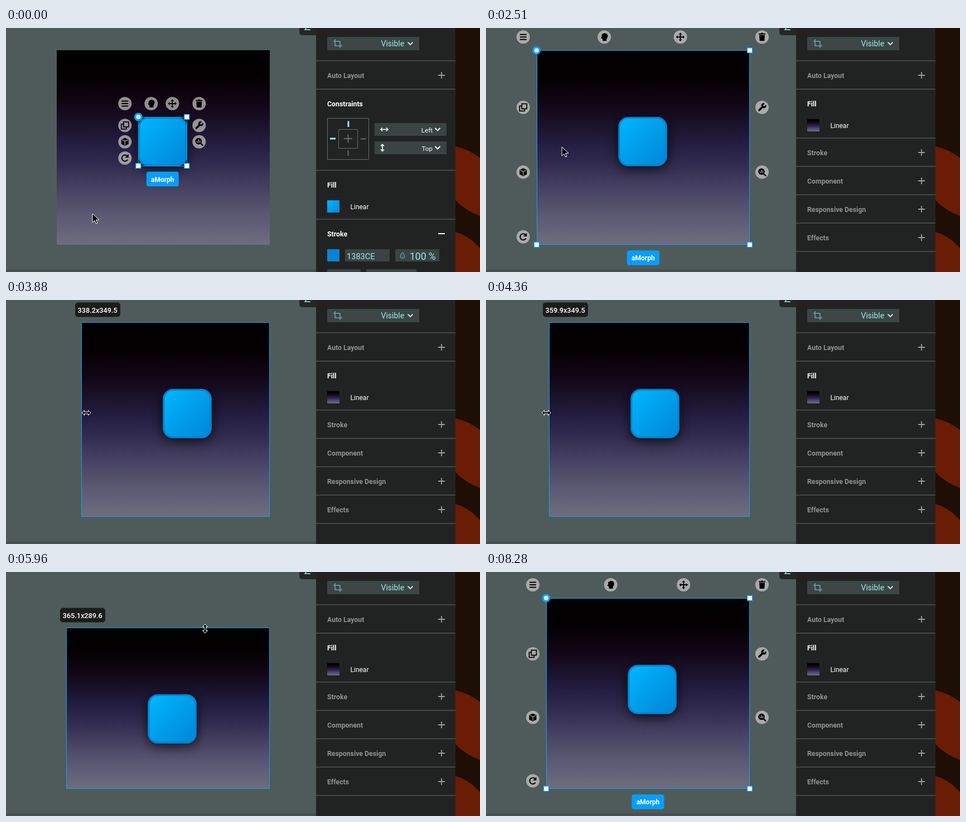
An HTML page for the animation above (9.02 s loop, 850x439 px).

```html
<!DOCTYPE html>
<html lang="en">
<head>
<meta charset="utf-8">
<title>Resizing a frame</title>
<style>
  html, body { margin: 0; width: 100%; height: 100%; overflow: hidden; background: #4f5b5a; }
  svg { display: block; }
  text { font-family: Roboto, "Liberation Sans", sans-serif; }
  .head { font-size: 12.3px; font-weight: 700; fill: #fff; }
  .dim { fill: #8f9392; }
  .body { font-size: 12px; fill: #fff; }
  .cyan { fill: #9fe9ec; }
  .line { fill: none; stroke: #000; stroke-width: 2; }
  .disc { fill: rgba(215, 213, 213, .66); }
</style>
</head>
<body>
<svg id="stage" width="850" height="439" viewBox="0 0 850 439">
  <defs>
    <linearGradient id="dusk" x2="0" y2="1">
      <stop offset="0" stop-color="#000"/>
      <stop offset=".13" stop-color="#040001"/>
      <stop offset=".28" stop-color="#120616"/>
      <stop offset=".38" stop-color="#1a122b"/>
      <stop offset=".48" stop-color="#231d40"/>
      <stop offset=".6" stop-color="#332e51"/>
      <stop offset=".72" stop-color="#484363"/>
      <stop offset=".85" stop-color="#5b5973"/>
      <stop offset="1" stop-color="#6e6d80"/>
    </linearGradient>
    <linearGradient id="sky" x2="1" y2="1">
      <stop offset="0" stop-color="#00b6ff"/>
      <stop offset="1" stop-color="#0786d6"/>
    </linearGradient>
    <filter id="shadow" x="-60%" y="-60%" width="220%" height="220%">
      <feDropShadow dx="0" dy="4" stdDeviation="11" flood-color="#000" flood-opacity=".8"/>
    </filter>
  </defs>

  <rect width="850" height="439" fill="#4f5b5a"/>
  <rect y="434" width="556" height="5" fill="#475053"/>

  <rect id="frame" fill="url(#dusk)"/>
  <rect id="tile" width="84.5" height="85.5" rx="16.5" fill="url(#sky)" stroke="#0685d3" stroke-width="3" filter="url(#shadow)"/>
  <rect id="outline" fill="none" stroke="#0c9ffb"/>

  <g id="halo"></g>

  <g id="size">
    <rect width="81" height="26" rx="5" fill="#1b1d1d"/>
    <text id="sizeText" x="4.5" y="18.5" font-size="12.7" font-weight="500" fill="#fff"></text>
  </g>

  <g id="wallpaper">
    <rect x="806" width="44" height="439" fill="#1e0f04"/>
    <g fill="#6b1c04">
      <path d="M806 213Q830 218 850 234V338Q826 330 806 310Z"/>
      <path d="M806 367Q830 374 850 396V439H806Z"/>
    </g>
  </g>
  <path d="M526 0H556V13H532Q526 13 526 7Z" fill="#242726"/>
  <path d="M535 3H546M537.5 0V3" stroke="#9fe9ec" stroke-width="1.6"/>
  <rect x="556" width="250" height="439" fill="#212322"/>
  <g id="common"></g>
  <g id="tilePanel"></g>
  <g id="framePanel"></g>

  <g id="cursor" fill="#000" stroke="#fff" stroke-linejoin="round">
    <path id="arrow" d="M0 0V16L4 12.3L6.6 18L9 17L6.5 11.3H12Z"/>
    <path id="resize" d="M-8 0L-3.5-4.5V-1.7H3.5V-4.5L8 0L3.5 4.5V1.7H-3.5V4.5Z"/>
  </g>
</svg>

<script>
const $ = id => document.getElementById(id);
const set = (el, attrs) => { for (const k in attrs) el.setAttribute(k, attrs[k]); };
const show = (el, on) => el.setAttribute('visibility', on ? 'visible' : 'hidden');
const place = (el, x, y, extra = '') => el.setAttribute('transform', `translate(${x} ${y})${extra}`);

// Properties panel
const box = (x, y, w, h, fill = '#3a4442', rx = 1) =>
  `<rect x="${x}" y="${y}" width="${w}" height="${h}" rx="${rx}" fill="${fill}"/>`;
const text = (x, y, str, cls = 'head', attrs = '') => `<text x="${x}" y="${y}" class="${cls}" ${attrs}>${str}</text>`;
const stroke = (d, color, w = 2) => `<path d="${d}" fill="none" stroke="${color}" stroke-width="${w}"/>`;
const rule = y => box(556, y - 1, 250, 2, '#424746', 0);
const chevron = (x, y, color) => stroke(`M${x - 4.5} ${y - 2.5}l4.5 4.5l4.5-4.5`, color);
const plusRow = (y, label) => text(576, y + 5, label, 'head dim') + stroke(`M775 ${y}H787M781 ${y - 6}v12`, '#979b9a', 1.8);
const select = (y, label, icon) => box(661, y, 129, 23) + stroke(icon, '#fff', 1.6) +
  text(765, y + 16.5, label, 'body', 'text-anchor="end" style="font-size:11.6px"') + chevron(774, y + 11.5, '#fff');

$('common').innerHTML =
  box(576, 16, 165, 24, '#3b4645') +
  stroke('M590 20V32H603M587 24H599V36', '#6ba9ab', 1.5) +
  text(672.5, 33, 'Visible', 'cyan', 'font-size="14"') + chevron(725, 28, '#9fe9ec') +
  rule(59) + plusRow(85, 'Auto Layout') + rule(110);

$('tilePanel').innerHTML =
  text(576, 141, 'Constraints') +
  stroke('M576.5 162.5H650.5V236.5H576.5ZM596.5 182.5H630.5V216.5H596.5Z', '#666b6a', 1) +
  stroke('M606 199H621M613.5 191.5V206.5M636 199.5H645.5M613.5 220V230', '#777c7b', 1.6) +
  stroke('M614 167.5V178M581 199H591', '#9fe9ec', 3) +
  select(171, 'Left', 'M672 182.5H685M675 179.5L672 182.5L675 185.5M682 179.5L685 182.5L682 185.5') +
  select(204, 'Top', 'M675 209.5V221.5M672 212.5L675 209.5L678 212.5M672 218.5L675 221.5L678 218.5') +
  rule(256) + text(576, 287, 'Fill') + box(576, 310, 22, 22, 'url(#sky)', 0) + text(617.5, 326, 'Linear', 'body') +
  rule(344) + text(576, 375, 'Stroke') + stroke('M775 370H787', '#fff') +
  box(576, 398, 22, 22, '#0a83d4', 0) +
  box(608, 398, 80, 22) + text(611, 416, '1383CE', 'cyan', 'font-size="14.6"') +
  box(698, 398, 79, 22) + text(724, 416.5, '100 %', 'cyan', 'font-size="17.5"') +
  '<path d="M711 403.5q4 5 4 7a4 4 0 0 1-8 0q0-2 4-7z" fill="#35595b" stroke="#78b9bb"/>' +
  box(576, 434, 60, 8) + box(646, 434, 90, 8);

$('framePanel').innerHTML =
  text(576, 141, 'Fill') + box(576, 164, 22, 22, 'url(#dusk)', 0) + text(617.5, 180, 'Linear', 'body') +
  ['Stroke', 'Component', 'Responsive Design', 'Effects']
    .map((label, i) => rule(198 + 51 * i) + plusRow(224 + 51 * i, label)).join('') + rule(402);

// Selection halo: icons are centred on their own origin
const icons = {
  menu: '<path class="line" d="M-6-4.5H6M-6 0H6M-6 4.5H6"/>',
  grab: '<path d="M-6 1L-4.5-1V-4Q-4-6-2-6Q0-8 2-6.5Q4.5-7 5-5Q6.7-4 6 0L4 4V7H-3V4Z"/>',
  move: '<path class="line" d="M0-6V6M-6 0H6"/><path d="M0-8L3-4.5H-3ZM0 8L3 4.5H-3ZM-8 0L-4.5-3V3ZM8 0L4.5-3V3Z"/>',
  trash: '<path d="M-6-6.5h4l1-1.2h2l1 1.2h4v2h-12zM-5-3.5h10l-.7 10.5h-8.6z"/>',
  copy: '<path class="line" style="stroke-width:1.7" d="M-2.5-6.5H6.5V2.5H-2.5ZM-2.5-2.5H-6.5V6.5H2.5V2.5"/>',
  wrench: '<path class="line" style="stroke-width:3.6;stroke-linecap:round" d="M-5 5L1.5-1.5"/><path class="line" style="stroke-width:3" d="M6.3-4A3.2 3.2 0 1 1 4-6.3"/>',
  cube: '<path d="M0-7L6.5-4V4L0 7.3L-6.5 4V-4Z"/><path d="M-5.5-3.5L0-1L5.5-3.5M0-1V6" fill="none" stroke="#a5a5a6" stroke-width="1.3"/>',
  zoom: '<circle cx="-1" cy="-1" r="5.8"/><path class="line" style="stroke-width:2.6" d="M3 3L7 7"/><path d="M-3.5 1.5V-1M-1 1.5V-4M1.5 1.5V-2.5" stroke="#a5a5a6" stroke-width="1.4"/>',
  redo: '<path class="line" d="M4.8 3A5.6 5.6 0 1 1 4-4"/><path d="M6.5-7V-.8H.3Z"/>'
};
const knob = id => `<rect id="${id}" x="-4.5" y="-4.5" width="9" height="9" fill="#fff" stroke="#0c9ffb" stroke-width="1.2"/>`;
$('halo').innerHTML =
  Object.keys(icons).map(k => `<g id="${k}"><circle class="disc" r="12"/>${icons[k]}</g>`).join('') +
  knob('ne') + knob('sw') + knob('se') +
  '<circle id="nw" r="5.8" fill="#d3ecff" stroke="#0c9ffb" stroke-width="3.4"/>' +
  '<g id="tag"><rect x="-29" width="58" height="26.5" rx="4" fill="#069efc"/>' +
  '<text y="18" font-size="12" font-weight="700" fill="#fff" text-anchor="middle">aMorph</text></g>';

function layHalo(l, t, r, b) {
  const w = r - l, h = b - t;
  const west = l - 24, east = r + 22, north = t - 24, south = b - 14;
  const upper = south - h * 2 / 3, lower = south - h / 3;
  const spots = {
    menu: [west, north], grab: [r - w * 2 / 3 - 6, north], move: [r - w / 3 + 3, north], trash: [east, north],
    copy: [west, upper], wrench: [east, upper], cube: [west, lower], zoom: [east, lower], redo: [west, south],
    nw: [l, t], ne: [r, t], sw: [l, b], se: [r, b], tag: [(l + r) / 2, b + 10.5]
  };
  for (const k in spots) place($(k), ...spots[k]);
}

// Motion: [tick, value...] with straight lines between, on a fixed tick
const LOOP = 9020, TICK = 59.6, RIGHT = 473, BOTTOM = 389.8;
const pointer = [
  [17, 155, 334], [19, 157.5, 304], [21, 157.5, 304], [22, 159, 304], [25, 159, 304],
  [33, 136, 214], [44, 136, 214], [50, 91, 204], [59, 91, 203], [65, 144, 203], [66, 144, 203],
  [73, 108, 203], [76, 108, 203], [82, 401, 48], [87, 356, 42.3], [92, 356, 42.3],
  [99, 357, 100], [100, 357, 102], [101, 357, 102], [108, 356, 52], [111, 356, 49], [114, 356, 49],
  [120, 520, 145], [122, 520, 145], [125, 527, 205], [135, 527, 205], [138, 805, 352]
];
const leftEdge = [[60, 90.7], [66, 143.6], [67, 144], [74, 107.9]];
const topEdge = [[92, 40.3], [99, 98], [100, 100.2], [101, 100.2], [108, 50], [111, 46.9]];

function at(keys, n) {
  const i = keys.findIndex(k => k[0] >= n);
  if (i === 0) return keys[0].slice(1);
  if (i < 0) return keys[keys.length - 1].slice(1);
  const a = keys[i - 1], b = keys[i], f = (n - a[0]) / (b[0] - a[0]);
  return a.slice(1).map((v, j) => v + (b[j + 1] - v) * f);
}
const within = (n, a, b) => n >= a && n <= b;

function draw(n) {
  const [l] = at(leftEdge, n), [t] = at(topEdge, n), [x, y] = at(pointer, n);
  const w = RIGHT - l, h = BOTTOM - t;
  const left = Math.round(l), top = Math.round(t), wide = RIGHT - left, high = 390 - top;
  const tileX = left + 146.3, tileY = top + 120;
  const frameActive = n >= 42;
  const dragging = within(n, 58, 76) || within(n, 93, 114);

  set($('frame'), { x: left, y: top, width: wide, height: high });
  set($('tile'), { x: tileX + 1.5, y: tileY + 1.5 });
  set($('outline'), frameActive ? { x: left + .5, y: top + .5, width: wide - 1, height: high - 1 }
    : { x: tileX + .2, y: tileY + .5, width: 87, height: 88 });

  show($('halo'), !dragging);
  if (frameActive) layHalo(l, t, RIGHT, BOTTOM);
  else layHalo(tileX, tileY, tileX + 87, tileY + 88);

  show($('size'), dragging);
  place($('size'), left - 11, top - 35.5);
  $('sizeText').textContent = w.toFixed(1) + 'x' + h.toFixed(1);

  show($('tilePanel'), !frameActive);
  show($('framePanel'), frameActive);

  const across = within(n, 50, 76), down = within(n, 87, 114), gone = n >= 139;
  show($('arrow'), !gone && !across && !down);
  show($('resize'), across || down);
  place($('cursor'), x, y, down ? ' rotate(90)' : '');
}

let last = -1;
function loop(now) {
  const n = Math.floor((now % LOOP + 12) / TICK);
  if (n !== last) draw(last = n);
  requestAnimationFrame(loop);
}
draw(0);
requestAnimationFrame(loop);
</script>
</body>
</html>
```
